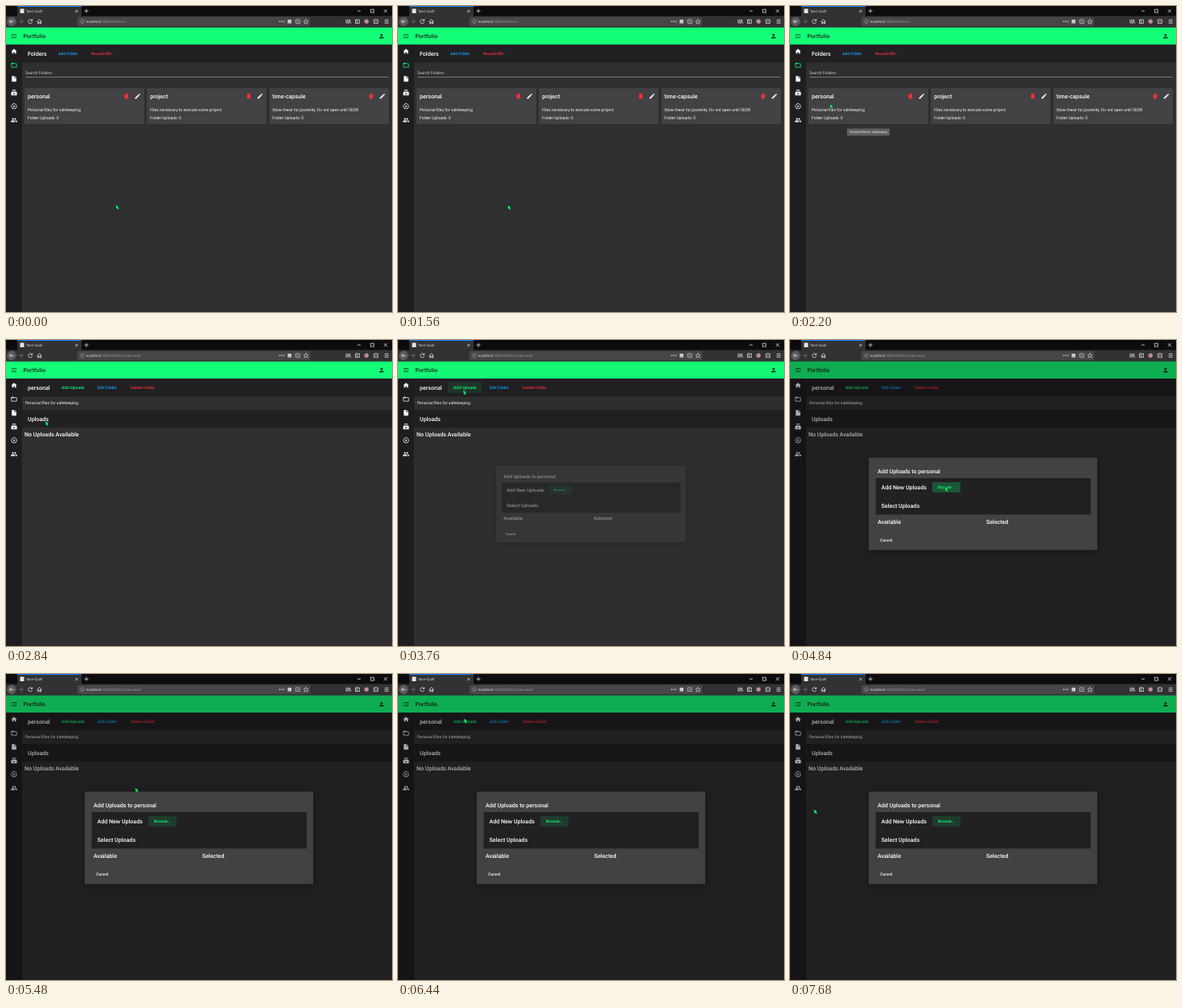
An HTML page for the animation above (8 s loop, 480x381 px).

```html
<!DOCTYPE html>
<html lang="en">
<head>
<meta charset="utf-8">
<title>Portfolio</title>
<style>
html, body { margin: 0; width: 100%; height: 100%; overflow: hidden; background: #2f2e30; }
svg { display: block; width: 480px; height: 381px; }
text { font-family: Roboto, sans-serif; text-rendering: geometricPrecision; white-space: pre; }
.ui { font-family: "Open Sans", sans-serif; }
</style>
</head>
<body>
<svg id="stage" viewBox="0 0 480 381"></svg>
<script>
const GREEN = '#14ff78', BLUE = '#12a5f4', RED = '#f4303c', WHITE = '#fff';
const DARK = '#212023', PANEL = '#2f2e30', CARD = '#424143';
const LOOP = 8000;

const icons = {
  menu: 'M3 18h18v-2H3zM3 13h18v-2H3zM3 6v2h18V6z',
  home: 'M10 20v-6h4v6h5v-8h3L12 3 2 12h3v8z',
  folder: 'M20 6h-8l-2-2H4Q2 4 2 6v12q0 2 2 2h16q2 0 2-2V8q0-2-2-2zm0 12H4V8h16z',
  file: 'M6 2Q4 2 4 4v16q0 2 2 2h12q2 0 2-2V8l-6-6zm7 7V3.5L18.5 9z',
  stack: 'M20 8H4V6h16zM18 2H6v2h12zM22 12v8q0 2-2 2H4q-2 0-2-2v-8q0-2 2-2h16q2 0 2 2zM16 16l-6-3.3v6.6z',
  play: 'M12 2a10 10 0 1 0 .01 0zm0 2a8 8 0 1 1-.01 0zM10 7.5v9l6-4.5z',
  people: 'M16 5a3 3 0 1 0 .01 0zM8 5a3 3 0 1 0 .01 0zM8 13q-7 .5-7 4v2h14v-2q0-3.500-7-4zM16 13q7 .5 7 4v2h-6v-2q0-2.500-2-4z',
  person: 'M12 4a4 4 0 1 0 .01 0zM12 14q-8 .5-8 4v2h16v-2q0-3.500-8-4z',
  trash: 'M6 19q0 2 2 2h8q2 0 2-2V7H6zM19 4h-3.500l-1-1h-5l-1 1H5v2h14z',
  edit: 'M3 17.250V21h3.750L17.800 9.900l-3.750-3.750zM20.700 7q.6-.7 0-1.400l-2.300-2.300q-.7-.6-1.400 0l-1.900 1.800 3.800 3.800z'
};
const rect = (x, y, w, h, fill, more = '') =>
  `<rect x="${x}" y="${y}" width="${w}" height="${h}" fill="${fill}" ${more}/>`;
const text = (x, y, str, size = 5, fill = WHITE, weight = 400, more = '') =>
  `<text x="${x}" y="${y + size * .355}" font-size="${size}" fill="${fill}" font-weight="${weight}" ${more}>${str}</text>`;
const title = (x, y, str, fill) => text(x, y, str, 7.1, fill, 500);
const button = (x, y, str, fill) => text(x, y, str, 5, fill, 500);
const icon = (name, x, y, fill = WHITE) =>
  `<path d="${icons[name]}" fill="${fill}" fill-rule="evenodd" transform="translate(${x - 4.26} ${y - 4.26}) scale(.355)"/>`;
const line = (d, stroke = '#ddd', width = .8) =>
  `<path d="${d}" fill="none" stroke="${stroke}" stroke-width="${width}"/>`;
const group = (id, body) => `<g id="${id}">${body}</g>`;

const browser =
  rect(0, 0, 480, 13, '#0c0c0f') + rect(0, 12.5, 480, 14, '#323234') +
  rect(14, 0, 80, 13, '#323234') + rect(14, 0, 80, 1, '#0a84ff') +
  rect(17.5, 3.5, 5, 5.5, '#e4e4e6') +
  text(25, 6.4, 'Tavin Quill', 4.2, '#f4f4f4', 400, 'class="ui"') +
  line('M86.300 5l3 3m0-3l-3 3M97.500 6.200h5M100 3.700v5') +
  line('M437 6.200h4M453.500 4.200h4v4h-4zM470 4.200l4 4m0-4l-4 4') +
  '<circle cx="7" cy="19.300" r="5.300" fill="#58585b" stroke="#77777a" stroke-width=".5"/>' +
  line('M9.700 19.300H4.500m2.300-2.300l-2.300 2.300 2.300 2.300', '#eee') +
  line('M16 19.300h5m-2.300-2.300l2.300 2.300-2.300 2.300', '#77777a') +
  line('M32.300 18a2.500 2.500 0 1 0 .3 2M32.700 16.500v2h-2') +
  line('M38.500 19.500l3-2.800 3 2.800M39.700 19v3h1.200v-2h1.400v2h1.200v-3') +
  rect(89, 13.8, 289, 11.2, '#474749', 'rx="1"') +
  line('M95 16.900a2.400 2.400 0 1 0 .01 0zM95 18.900v2M95 17.700v.7', '#b5b5b7', .5) +
  `<text class="ui" x="100" y="20.900" font-size="4.400" fill="#f4f4f4">localhost<tspan id="path" fill="#a2a2a5"></tspan></text>` +
  [340.500, 343, 345.500].map(x => `<circle cx="${x}" cy="19.300" r=".8" fill="#ddd"/>`).join('') +
  rect(350.3, 17, 4.6, 4.6, '#ccc') +
  line('M360.200 17h5v4.600h-5zM361.500 19.300h2.500M373 16.400l.9 2 2.100.2-1.600 1.400.5 2.100-1.900-1.100-1.900 1.100.5-2.100-1.600-1.400 2.100-.2z', '#ccc', .7) +
  line('M423 16.800v5M424.700 16.800v5M426.400 16.800v5M427.300 17l1.400 4.800M434.500 17h5v4.600h-5zM436.500 17v4.600') +
  '<circle cx="448.300" cy="19.200" r="2.700" fill="#b98c94"/>' +
  line('M457.500 17h5v4.600h-5zM458.800 19.300h2.500M470.800 17.300h5M470.800 19.300h5M470.800 21.300h5');

const card = (x, name, about) =>
  rect(x, 103, 149, 45, '#201f21', 'opacity=".5" rx="1"') + rect(x, 102.3, 149, 45, CARD, 'rx="1"') +
  title(x + 4, 112.3, name) + icon('trash', x + 126.7, 112.3, RED) + icon('edit', x + 140.7, 112.3) +
  text(x + 4, 129.4, about) + text(x + 4, 139.5, 'Folder Uploads: 0');

const listPage =
  rect(20, 48, 460, 22.3, DARK) + title(27, 59.3, 'Folders') +
  button(65, 59.3, 'Add Folder', BLUE) + button(106, 59.3, 'Recycle Bin', RED) +
  text(24, 83.2, 'Search Folders', 5, '#ccc') + rect(24, 88.2, 452, .6, '#a5a5a7') +
  card(23, 'personal', 'Personal files for safekeeping') +
  card(175.2, 'project', 'Files necessary to execute some project') +
  card(327.3, 'time-capsule', 'Store these for posterity. Do not open until 3020!') +
  group('tip', rect(71, 152.5, 53, 9, '#616163', 'rx="1"') +
    text(97.5, 157, 'Personal files for safekeeping', 3.55, WHITE, 400, 'text-anchor="middle"'));

const folderPage =
  rect(20, 48, 460, 22.3, DARK) + rect(20, 87, 460, 22, DARK) + title(27, 59.3, 'personal') +
  rect(62, 52.8, 42, 13, GREEN, 'id="addHover" rx="1"') + button(69, 59.3, 'Add Uploads', GREEN) +
  button(114, 59.3, 'Edit Folder', BLUE) + button(155, 59.3, 'Delete Folder', RED) +
  text(24, 78.5, 'Personal files for safekeeping') +
  title(27, 98, 'Uploads') + title(23, 117.8, 'No Uploads Available');

const dialog =
  rect(98, 148.5, 284, 115, '#000', 'opacity=".3" style="filter:blur(4px)"') +
  rect(98, 146.5, 284, 115, CARD, 'rx="1"') + title(109, 163.3, 'Add Uploads to personal') +
  rect(106.5, 172, 267.5, 45.3, DARK) + title(113.5, 183.3, 'Add New Uploads') +
  rect(177, 177, 35, 12.8, GREEN, 'id="browse" rx="1"') + button(184, 183.3, 'Browse...', GREEN) +
  title(113.5, 206.3, 'Select Uploads') + title(109, 226, 'Available') + title(244, 226, 'Selected') +
  button(112, 249.3, 'Cancel', WHITE);

const stage = document.getElementById('stage');
stage.innerHTML =
  rect(0, 0, 480, 381, PANEL) + rect(0, 48, 20, 333, '#1e1d20') +
  group('list', listPage) + group('folder', folderPage) +
  ['home', 'folder', 'file', 'stack', 'play', 'people'].map((name, i) =>
    `<g${i === 1 ? ' id="active"' : ''}>${icon(name, 10, 56.500 + i * 17.1, 'currentColor')}</g>`).join('') +
  rect(0, 26.5, 480, 21.5, GREEN) + icon('menu', 10, 37.5, '#16301f') +
  title(21.5, 37.3, 'Portfolio', '#10281a') + icon('person', 467, 37.5, '#10281a') +
  rect(0, 26.5, 480, 354.5, '#000', 'id="shade"') + group('dialog', dialog) + browser +
  `<path id="cursor" d="M0 0L4 2.400 2.900 3.200 4.100 5 2.700 6 1.600 4.400.5 5.300z" fill="${GREEN}" stroke="#10301e" stroke-width=".5"/>`;
stage.style.color = WHITE;

const el = id => document.getElementById(id);
const ramp = (t, from, length) => Math.min(1, Math.max(0, (t - from) / length));
const easeOut = p => 1 - (1 - p) ** 3;
const smooth = p => p * p * (3 - 2 * p);

// time, x, y of the pointer tip
const track = [
  [0, 136.5, 247.5], [1540, 136.5, 247.5], [1640, 135, 252], [2080, 58, 136], [2200, 49.5, 122],
  [2360, 39, 113], [2620, 39, 113], [3320, 81, 62.5], [3840, 81, 62.5], [4040, 124, 104.5],
  [4200, 190, 181], [4480, 78, 58], [4840, 192.5, 183], [5080, 78, 58], [5320, 194, 180],
  [5760, 84, 54], [6300, 84, 54], [6440, 82, 55.5], [6700, 82, 55.5], [6800, 86, 61],
  [7200, 38, 184], [7480, 29.7, 168.5], [LOOP, 29.7, 168.5]
];
function pointer(t) {
  const i = track.findIndex(k => k[0] > t);
  const [t0, x0, y0] = track[i - 1], [t1, x1, y1] = track[i];
  const p = smooth((t - t0) / (t1 - t0));
  return [x0 + (x1 - x0) * p, y0 + (y1 - y0) * p];
}

function render(t) {
  const inFolder = t >= 2600;
  el('list').style.display = inFolder ? 'none' : '';
  el('folder').style.display = inFolder ? '' : 'none';
  el('active').style.color = inFolder ? WHITE : GREEN;
  el('path').textContent = inFolder ? ':5000/folder/2/personal' : ':5000/folders/2';
  el('tip').setAttribute('opacity', ramp(t, 2060, 120) - ramp(t, 2260, 80));

  el('addHover').setAttribute('opacity', .1 * (ramp(t, 3160, 150) - ramp(t, 4200, 200)));
  el('shade').setAttribute('opacity', .32 * easeOut(ramp(t, 3755, 250)));
  const open = easeOut(ramp(t, 3735, 150));
  const scale = .7 + .3 * open;
  el('dialog').setAttribute('opacity', open);
  el('dialog').setAttribute('transform', `translate(240 204) scale(${scale}) translate(-240 -204)`);

  const [x, y] = pointer(t);
  const hover = ramp(t, 4740, 80) - ramp(t, 4900, 150);
  el('browse').setAttribute('opacity', .12 + .12 * hover);
  el('cursor').setAttribute('transform', `translate(${x} ${y})`);
}

const start = performance.now();
function tick() {
  render((performance.now() - start) % LOOP);
  requestAnimationFrame(tick);
}
tick();
</script>
</body>
</html>
```
